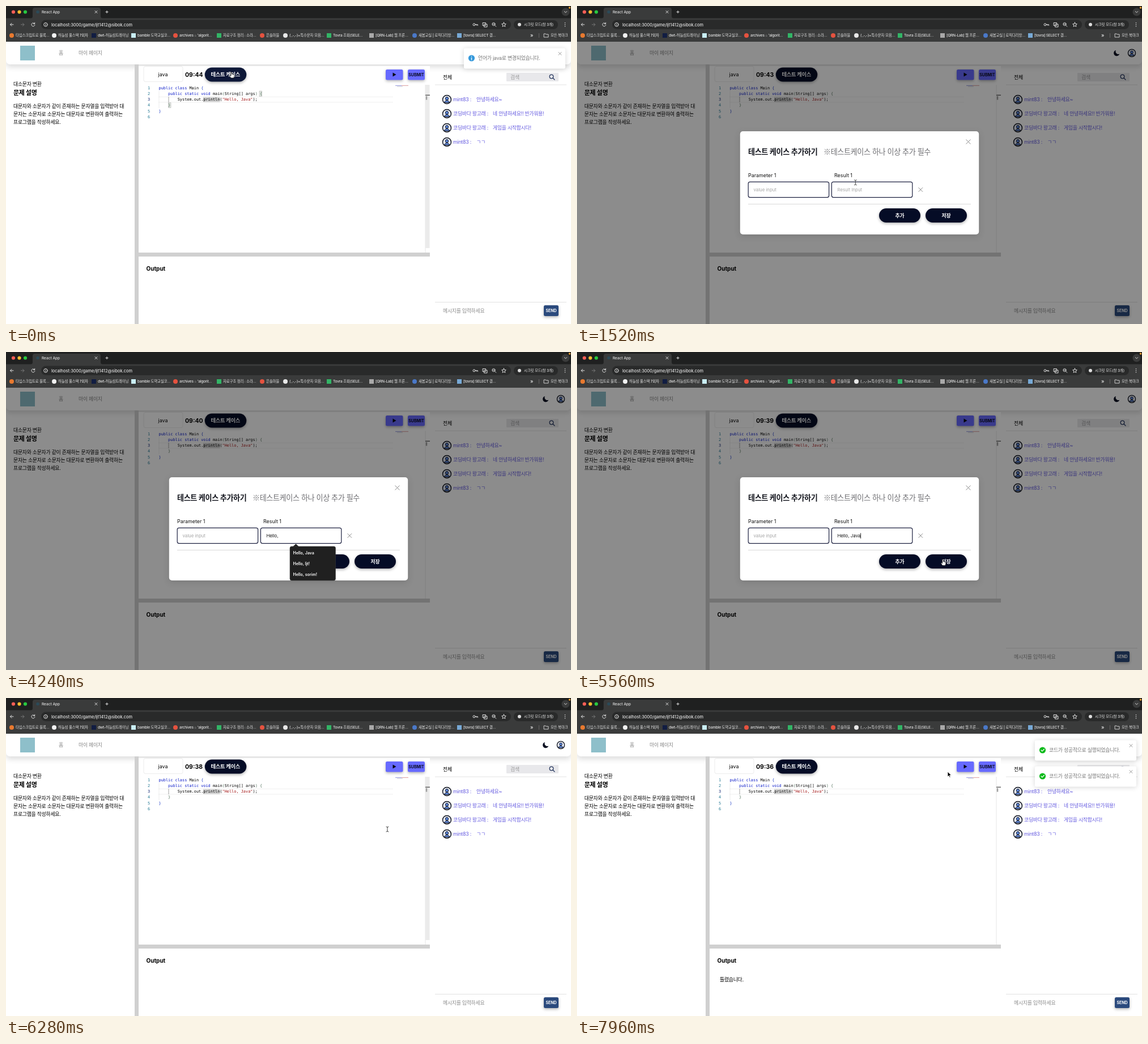
Write an HTML page that moves like this. It is 997x561 px and loops after 8000 ms.

```html
<!DOCTYPE html>
<html lang="ko">
<head>
<meta charset="utf-8">
<title>Code editor</title>
<style>
  html, body { margin: 0; width: 100%; height: 100%; overflow: hidden; background: #fff; }
  svg { display: block; width: 100vw; height: 100vh; }
  text { font-family: Inter, "Noto Sans CJK KR", "Noto Sans CJK", sans-serif; font-size: 8.9px; letter-spacing: -.03em; white-space: pre; }
  .la { letter-spacing: 0; }
  .b { font-weight: 700; }
  .mid { text-anchor: middle; }
  .cjk { font-family: "Noto Sans CJK KR", "Noto Sans CJK", sans-serif; }
  .ui text { font-size: 6.5px; fill: #e4e4e4; font-weight: 500; }
  .line { fill: none; stroke-linecap: round; stroke-linejoin: round; }
  .code text, .nums text { font-family: "DejaVu Sans Mono", "Liberation Mono", monospace; font-size: 6.9px; letter-spacing: 0; }
  .nums text { fill: #237893; text-anchor: middle; }
  .k { fill: #0a1ac8; } .s { fill: #a31515; } .p { fill: #2340c8; } .q { fill: #4f6f5a; }
  .raise { filter: drop-shadow(0 2px 2.5px rgba(0,0,0,.3)); }
  .toast rect { fill: #fff; filter: drop-shadow(0 1px 4px rgba(0,0,0,.16)); }
  .toast text { fill: #757575; }
  .chat text { fill: #665ce0; }
  .list text { fill: #fff; font-size: 7px; font-weight: 600; letter-spacing: 0; }
</style>
</head>
<body>
<svg viewBox="0 0 997 561">
  <defs>
    <g id="face">
      <circle r="7.5" fill="#e9eefb" stroke="#10131c" stroke-width="1.5"/>
      <path d="M-4.5 5.3C-4 .4 4 .4 4.5 5.3Z" fill="#5c86dc" stroke="#10131c"/>
      <circle cy="-1.7" r="2.7" fill="#5c86dc" stroke="#10131c"/>
    </g>
    <path id="cross" d="M-1-1 1 1M1-1-1 1" class="line" vector-effect="non-scaling-stroke"/>
  </defs>

  <rect width="997" height="561" fill="#fff"/>
  <rect y="55" width="997" height="48" rx="7" fill="#fff" style="filter:drop-shadow(0 5px 5px rgba(0,0,0,.13))"/>
  <rect x="25" y="70" width="26" height="26" fill="#8ebfca"/>
  <g fill="#858585"><text x="93" y="85.5">홈</text><text x="128" y="85.5">마이 페이지</text></g>
  <path d="M951 78A5.2 5.2 0 1 0 957.3 84.5A4.8 4.8 0 0 1 951 78Z" fill="#0a0f20"/>
  <use href="#face" transform="translate(979 83) scale(.88)"/>

  <text x="13" y="141">대소문자 변환</text>
  <text x="13" y="156.5" class="b" style="font-size:11px">문제 설명</text>
  <text x="13" y="180">대문자와 소문자가 같이 존재하는 문자열을 입력받아 대</text>
  <text x="13" y="194">문자는 소문자로 소문자는 대문자로 변환하여 출력하는</text>
  <text x="13" y="207.5">프로그램을 작성하세요.</text>

  <rect x="234" y="106" width="514" height="455" fill="#fff"/>
  <path d="M227 103h7v458h-7zM234 435h514v7h-514z" fill="#d0d0d0"/>

  <rect x="243" y="106.5" width="69" height="27" rx="3" fill="#fff" stroke="#ececec"/>
  <text x="277" y="124" class="la mid">java</text>
  <text id="clock" x="316" y="125" class="la b" style="font-size:10.5px"></text>
  <rect id="caseBtn" class="raise" x="350.8" y="108.5" width="73.5" height="25" rx="12.5"/>
  <text x="387.3" y="124.3" class="b mid" fill="#fff" style="font-size:9.3px">테스트 케이스</text>
  <rect id="runBtn" class="raise" x="670" y="112" width="30.5" height="18.5" rx="2.5"/>
  <path d="M682.5 117.5v7l6-3.5z" fill="#05060f"/>
  <rect class="raise" x="709" y="112" width="30" height="18.5" rx="2.5" fill="#676aff"/>
  <text x="724" y="123.7" class="la b mid" fill="#0a0c20" style="font-size:7px">SUBMIT</text>

  <path d="M269 160.3H683M269 169.8H683" stroke="#ececec" stroke-width=".8"/>
  <path d="M287 160v10" stroke="#8c8c8c" stroke-width=".8"/>
  <path d="M270 150v30" stroke="#e0e0e0" stroke-width=".6"/>
  <rect x="348" y="160.5" width="29.5" height="9" fill="#d2d2d2"/>
  <path id="brackets" d="M447 150h4.5v9.5h-4.5zM286.5 170.5h4.5v9h-4.5z" fill="#e0e6e0" stroke="#b5b5b5" stroke-width=".6"/>
  <g class="nums" id="nums"></g>
  <g class="code">
    <text x="269.5" y="146.5"><tspan class="k">public class</tspan> Main <tspan class="p">{</tspan></text>
    <text x="286.1" y="156.9"><tspan class="k">public static void</tspan> main<tspan class="q">(</tspan>String[] args<tspan class="q">) {</tspan></text>
    <text x="302.7" y="167.2">System.out.println(<tspan class="s">"Hello, Java"</tspan>);</text>
    <text x="286.1" y="177.4" class="q">}</text>
    <text x="269.5" y="187.6" class="p">}</text>
  </g>
  <path d="M687 140.3h11" stroke="#8f94dd"/><path d="M698 140.3h12" stroke="#d99a9a"/><path d="M690 142h10" stroke="#b9b9c8" stroke-width=".8"/>
  <path d="M740 139v296" stroke="#e6e6e6"/>
  <rect id="scroll" x="740" y="139" width="7.5" height="288" fill="#ebebeb"/>
  <path d="M740 157.3h8" stroke="#444" stroke-width="1.2"/><path d="M742 159v6.5" stroke="#a0a0a0" stroke-width="2.5"/>

  <text x="247.5" y="467" class="la b" style="font-size:10px">Output</text>
  <text id="verdict" x="252" y="499.5" font-weight="500">틀렸습니다.</text>

  <text x="771" y="128.5">전체</text>
  <rect x="883" y="118" width="92" height="15" rx="1" fill="#e8e8eb"/>
  <text x="890" y="128.7" fill="#9a9a9a">검색</text>
  <g class="line" stroke="#26375e" stroke-width="1.3"><circle cx="962.5" cy="124.5" r="3.3"/><path d="M965 127l3 3"/></g>
  <path d="M757 139h232M757 522.5h232" stroke="#e2e2e2"/>
  <g class="chat" id="chat"></g>
  <text x="771" y="540.5" fill="#8c8c8c">메시지를 입력하세요</text>
  <rect class="raise" x="949" y="528" width="26" height="19" rx="2.5" fill="#2b4a7d"/>
  <text x="962" y="540" class="la b mid" fill="#fff" style="font-size:7px">SEND</text>

  <rect id="mask" y="63" width="997" height="498" fill="#000"/>
  <g id="modal">
    <rect x="287.8" y="221" width="421.4" height="182" rx="5" fill="#fff" style="filter:drop-shadow(0 3px 6px rgba(0,0,0,.12))"/>
    <use href="#cross" transform="translate(690.5 239.5) scale(3.7)" stroke="#888"/>
    <text x="302" y="262.3" font-weight="600" fill="#15171f" style="font-size:13.1px">테스트 케이스 추가하기</text>
    <text x="435" y="262.3" fill="#6f6f73" style="font-size:13.1px"><tspan class="cjk">※</tspan>테스트케이스 하나 이상 추가 필수</text>
    <g fill="#111"><text x="302" y="301.8" class="la">Parameter 1</text><text x="454" y="301.8" class="la">Result 1</text></g>
    <g fill="#fff" stroke="#1d2140" stroke-width="1.2"><rect x="302.2" y="310.3" width="142.4" height="27.3" rx="3"/><rect x="449.4" y="310.3" width="142.4" height="27.3" rx="3"/></g>
    <text x="311.5" y="327.3" class="la" fill="#a5a5a5" style="font-size:7.8px">value input</text>
    <text id="field" x="459.5" y="327.3" class="la" xml:space="preserve" style="font-size:7.8px"></text>
    <rect id="caret" y="319.5" width=".9" height="9.5" fill="#111"/>
    <use href="#cross" transform="translate(606.3 324) scale(3.5)" stroke="#888"/>
    <path d="M302 349.5h393" stroke="#d9d9d9"/>
    <g class="raise" fill="#050c26"><rect x="533" y="357" width="73" height="25" rx="12.5"/><rect x="615" y="357" width="73" height="25" rx="12.5"/></g>
    <g fill="#fff"><text x="569.5" y="372.8" class="b mid">추가</text><text x="651.5" y="372.8" class="b mid">저장</text></g>
  </g>
  <g class="list" id="list">
    <path d="M506 343.5l5.5-5 5.5 5z" fill="#202020"/>
    <rect id="listBox" x="501" y="343" width="80.5" rx="3" fill="#202020" stroke="#3a3a3a" stroke-width=".6"/>
    <g id="items"></g>
  </g>

  <g id="toasts"></g>

  <g class="ui">
    <rect width="997" height="63" fill="#3a3b3b"/>
    <rect width="997" height="21.5" fill="#1f2020"/>
    <path d="M43 22q4 0 4-4v-11q0-4 4-4h112q4 0 4 4v11q0 4 4 4z" fill="#3a3b3b"/>
    <circle cx="13" cy="10.5" r="3.1" fill="#fe5f57"/><circle cx="23.5" cy="10.5" r="3.1" fill="#febc2e"/><circle cx="34" cy="10.5" r="3.1" fill="#28c840"/>
    <circle cx="56" cy="10.5" r="2.8" fill="#2b4a58"/>
    <text x="63" y="12.8" class="la">React App</text>
    <use href="#cross" transform="translate(159 10.5) scale(2)" stroke="#ddd"/>
    <path d="M175.5 10.5h5M178 8v5" stroke="#ddd"/>
    <circle cx="987.5" cy="10.5" r="7" fill="#3a3b3b"/>
    <path d="M985.3 9.5l2.2 2.2 2.2-2.2" class="line" stroke="#ddd"/>
    <circle cx="994.5" cy="3" r="1.7" fill="#f0a030"/>
    <rect x="62" y="24.5" width="829" height="16.5" rx="8.2" fill="#292a2a"/>
    <rect x="896" y="25" width="78" height="16" rx="8" fill="#292a2a"/>
    <g class="line" stroke="#dedede">
      <path d="M13 32.8h-5.5m2.5-2.5l-2.5 2.5 2.5 2.5"/>
      <path d="M26.5 32.8h5.5m-2.5-2.5l2.5 2.5-2.5 2.5" stroke="#777"/>
      <path d="M50.3 31a3 3 0 1 0 .6 2.4M50.7 29.3v2.2h-2.2"/>
      <circle cx="70" cy="32.8" r="3.3"/><path d="M70 32.5v1.8M70 31v.1"/>
      <circle cx="826" cy="32.8" r="2"/><path d="M828 32.8h4.5v1.5M830.5 32.8v1.3"/>
      <rect x="841.5" y="29.5" width="5" height="5"/><rect x="844" y="32" width="5" height="5"/>
      <circle cx="860.5" cy="32" r="2.6"/><path d="M862.5 34l2.3 2.3M859.3 32h2.4"/>
      <path d="M878.5 29l1.1 2.5 2.7.3-2 1.8.6 2.7-2.4-1.4-2.4 1.4.6-2.7-2-1.8 2.7-.3z"/>
    </g>
    <text x="80" y="35.5" class="la" style="font-size:7.35px">localhost:3000/game/ljt1412@sibok.com</text>
    <circle cx="906" cy="32.8" r="3" fill="#dedede"/>
    <text x="914" y="35.3">시크릿 모드(창 3개)</text>
    <g fill="#dedede"><circle cx="986.5" cy="29.8" r=".8"/><circle cx="986.5" cy="32.8" r=".8"/><circle cx="986.5" cy="35.8" r=".8"/></g>
    <g id="marks"></g>
    <text x="925" y="54.5" style="font-size:9px">»</text>
    <path d="M940.5 48v8" stroke="#666"/>
    <path d="M949.5 49h2.5l1 1h4v5h-7.5z" class="line" stroke="#dedede" stroke-width=".9"/>
    <text x="961" y="54.3">모든 북마크</text>
  </g>

  <g id="cursor">
    <path id="hand" d="M-1.5-5Q-.5-6 .3-5L.7-1.8Q1.7-2.3 2.2-1.5Q3.3-1.9 3.7-1Q5-1 5 .2Q5 2.5 3.8 5H-1Q-2.5 3-3.8 1Q-3.5-.2-2.2.5L-1 1.2Z" fill="#fff" stroke="#111" stroke-width=".8"/>
    <path id="arrow" d="M-2-5v9l2.1-1.9 1.5 3.2 1.5-.7-1.5-3.1 2.8-.3z" fill="#000" stroke="#fff" stroke-width=".8"/>
    <path id="beam" d="M-2-4.5Q0-4.5 0-3Q0-4.5 2-4.5M0-3.5v7M-2 4.5Q0 4.5 0 3Q0 4.5 2 4.5" class="line" stroke="#4a4a4a"/>
  </g>
</svg>

<script>
const $ = id => document.getElementById(id);
const LOOP = 8000, OPEN = 600, CLOSE = 5760, PICK = 5220;

// x, colour, corner radius, label
const bookmarks = [
  [10, '#e8792f', 4, '타입스크립트로 블록…'], [85, '#f1f1f1', 4, '하늘섬 풀스택 7회차'],
  [155, '#111d42', 0, 'dwt-하늘섬트레이닝'], [225, '#c9eef5', 0, 'bamble 도약교실코…'],
  [299, '#e5523f', 4, "archives :: 'algorit…"], [376, '#32b566', 0, '자료구조 정리 : 소라…'],
  [452, '#e5523f', 4, '은솔마을'], [493, '#e8e8e8', 4, '( ,-,-)+특수문자 모음…'],
  [570, '#32b566', 0, 'Tovra 조회(SELE…'], [645, '#a9a9a9', 0, '[QRN-Lab] 웹 프론…'],
  [721, '#4a78c8', 4, '새봄교실 | 로직다리방…'], [800, '#77a9d6', 0, '[tovra] SELECT 결…']
];
$('marks').innerHTML = bookmarks.map(([x, color, rx, label]) =>
  `<rect x="${x - 4}" y="48" width="8" height="8" rx="${rx}" fill="${color}"/><text x="${x + 7}" y="54.3">${label}</text>`).join('');

$('nums').innerHTML = [1, 2, 3, 4, 5, 6].map(n =>
  `<text x="252" y="${136.3 + n * 10.25}"${n === 3 ? ' style="fill:#0b216f"' : ''}>${n}</text>`).join('');

const chat = [
  ['mint83 :', 830, '안녕하세요~'], ['코딩바다 왕고래 :', 859, '네 안녕하세요!! 반가워용!'],
  ['코딩바다 왕고래 :', 859, '게임을 시작합시다!'], ['mint83 :', 830, 'ㄱㄱ']
];
$('chat').innerHTML = chat.map(([who, x, msg], i) => {
  const y = 165 + i * 25;
  return `<use href="#face" transform="translate(778 ${y})"/><text x="789" y="${y + 3}">${who}</text><text x="${x}" y="${y + 3}">${msg}</text>`;
}).join('');

const badge = (color, d) => `<circle cx="821.5" cy="92" r="5.6" fill="${color}"/><path d="${d}" class="line" stroke="#fff" stroke-width="1.3"/>`;
const info = badge('#3498db', 'M821.5 91.5v3.5M821.5 89v.2');
const check = badge('#0dba1b', 'M819 92l1.9 1.9 3.4-3.6');
const toasts = [
  [0, info, '언어가 java로 변경되었습니다.'],
  [0, check, '코드가 성공적으로 실행되었습니다.'],
  [46, check, '코드가 성공적으로 실행되었습니다.']
].map(([y, icon, msg]) => {
  $('toasts').insertAdjacentHTML('beforeend', `<g><g class="toast" transform="translate(0 ${y})">
    <rect x="808" y="74.5" width="179" height="36" rx="3"/>${icon}<text x="833" y="95">${msg}</text>
    <use href="#cross" transform="translate(977.5 84) scale(2.5)" stroke="#999"/></g></g>`);
  return $('toasts').lastElementChild;
});

const edits = [
  [0, ''], [1720, ''], [2560, 'H'], [2720, 'He'], [2880, 'Hel'], [3040, 'Hell'], [3200, 'Hello'],
  [3520, 'Hello,'], [3760, 'Hello, '], [PICK, 'Hello, Java']
];
const options = ['Hello, Java', 'hello', 'Hello, ljt!', 'Hello!', 'Hello', 'Hello, sorim!'];

// time, x, y, pointer shape
const path = [
  [0, 398, 122, 'hand'], [920, 398, 122, 'arrow'], [1480, 490, 310, 'beam'], [1700, 505, 325, 'beam'],
  [4920, 505, 325, 'beam'], [5000, 512, 338, 'arrow'], [5140, 524, 355, 'arrow'], [5240, 524, 355, 'arrow'],
  [5500, 640, 371, 'hand'], [5700, 667, 374, 'hand'], [CLOSE, 667, 374, 'beam'], [5840, 667, 374, 'beam'],
  [6560, 676, 160, 'beam'], [6680, 680, 134, 'hand'], [6860, 682.5, 122, 'hand'],
  [7400, 682.5, 122, 'hand'], [7520, 672, 129, 'arrow'], [7720, 656, 135, 'arrow'], [LOOP, 656, 135, 'arrow']
];
const slideOut = [[0, 0], [900, 0], [1050, -16], [1650, 1620]];
const slideIn = [[0, 2400], [7230, 2400], [7668, -20], [7778, 8], [7887, -4], [7960, 0]];

const clamp = v => Math.min(1, Math.max(0, v));
const easeOut = v => 1 - (1 - v) ** 3;
const smooth = v => v * v * (3 - 2 * v);
const show = (el, on) => { el.style.visibility = on ? 'visible' : 'hidden'; };
const last = (steps, t) => steps.reduce((found, s) => s[0] <= t ? s : found);

function along(steps, t, col, ease) {
  const i = steps.indexOf(last(steps, t)), a = steps[i], b = steps[i + 1];
  return b ? a[col] + (b[col] - a[col]) * ease((t - a[0]) / (b[0] - a[0])) : a[col];
}

function drawForm(t, open) {
  const [since, value] = last(edits, t);
  const field = $('field');
  field.textContent = value || 'Result Input';
  field.setAttribute('fill', value ? '#111' : '#a5a5a5');
  const focused = open && t >= 1720 && t < 5720;
  show($('caret'), focused && Math.floor((t - since) / 480) % 2 === 0);
  $('caret').setAttribute('x', 459.5 + (value ? field.getComputedTextLength() : 0));

  const listed = t >= 2560 && t < PICK;
  show($('list'), listed);
  if (!listed) return;
  const found = options.filter(o => o.toLowerCase().startsWith(value.toLowerCase()));
  $('listBox').setAttribute('height', 4 + 18.7 * found.length);
  $('items').innerHTML = found.map((o, i) => `<text x="506.5" y="${357.3 + 18.7 * i}">${o}</text>`).join('');
}

function render(t) {
  const open = t >= OPEN && t < CLOSE;
  const p = open ? clamp((t - OPEN) / 190) : 0;
  const scale = .2 + .8 * easeOut(p);
  $('mask').style.opacity = .45 * p;
  $('modal').style.opacity = easeOut(p);
  $('modal').setAttribute('transform', `translate(398 121) scale(${scale}) translate(-398 -121)`);
  show($('modal'), open);
  drawForm(t, open);

  const left = 44 - (t < 1160 ? 0 : 1 + Math.floor((t - 1160) / 960));
  $('clock').textContent = '09:' + left;
  $('caseBtn').setAttribute('fill', t < OPEN ? '#0e1838' : '#050c26');
  $('runBtn').setAttribute('fill', t >= 6680 && t < 7500 ? '#8486ff' : '#676aff');
  show($('brackets'), t < 700);
  $('scroll').style.opacity = t < 3000 ? 1 - clamp((t - 600) / 180) : t < CLOSE ? 0 : 1 - clamp((t - 6650) / 400);
  show($('verdict'), t >= 7480);

  toasts.forEach((el, i) => {
    const x = along(i ? slideIn : slideOut, t, 1, i ? easeOut : smooth);
    el.setAttribute('transform', `translate(${x} 0)`);
    show(el, x < 240);
  });

  const shape = last(path, t)[3];
  const visible = t < 2560 || t >= 4920;
  for (const id of ['hand', 'arrow', 'beam']) show($(id), visible && id === shape);
  $('cursor').setAttribute('transform', `translate(${along(path, t, 1, smooth)} ${along(path, t, 2, smooth)})`);
}

const start = performance.now();
function tick() {
  render((performance.now() - start) % LOOP);
  requestAnimationFrame(tick);
}
tick();
</script>
</body>
</html>
```
